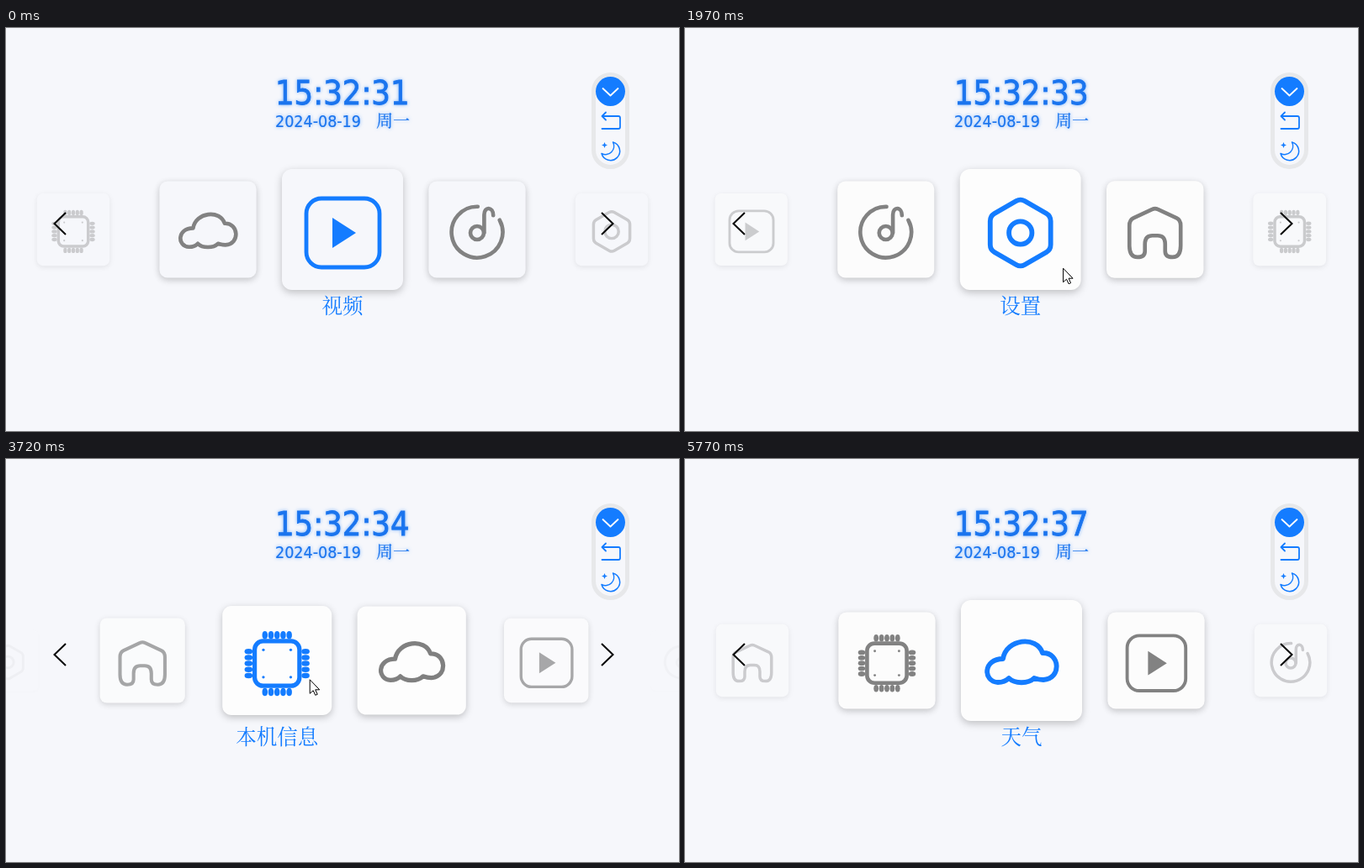
Write an HTML page that moves like this. It is 800 by 480 pixels and loops after 6.05 s.

```html
<!DOCTYPE html>
<html lang="zh">
<head>
<meta charset="utf-8">
<style>
  html, body { margin: 0; height: 100%; overflow: hidden; background: #f6f7fb; }
  svg { display: block; width: 800px; height: 480px; }
  text { fill: #147cff; font-family: "DejaVu Sans Condensed", "Open Sans", "Noto Sans", sans-serif; }
  .cjk { font-family: "Noto Serif CJK SC", "Noto Sans CJK SC", serif; font-weight: 300; }
  .glow { filter: drop-shadow(0 0 2px #147cff88); }
  .glow text { fill: #1a74ee; stroke: #1a74ee; stroke-width: .2; }
  .line { fill: none; stroke: #147cff; stroke-width: 1.8; stroke-linecap: round; stroke-linejoin: round; }
  .arrow { fill: none; stroke: #000; stroke-width: 2; }
  .tile { filter: drop-shadow(0 3px 5px #0000003a); }
  .icon { fill: none; stroke: currentColor; stroke-width: 5.8; stroke-linecap: round; stroke-linejoin: round; }
  .solid { fill: currentColor; stroke: none; }
</style>
</head>
<body>
<svg viewBox="0 0 800 480">
  <g class="glow">
    <text id="clock" x="320" y="90.5" font-size="39.5" style="stroke-width:.8"></text>
    <text x="320" y="118" font-size="19.5">2024-08-19</text>
    <text class="cjk" x="440" y="118" font-size="20">周一</text>
  </g>

  <rect x="698.5" y="55.5" width="40" height="110" rx="20" fill="#f6f7fb" stroke="#e7e8ea" stroke-width="5"/>
  <circle cx="718.5" cy="75.5" r="17.5" fill="#147cff"/>
  <path class="line" style="stroke:#fff" d="M709.5 72l9 8.5 9-8.5"/>
  <path class="line" d="M713 100.5l-4.5 4.5 4.5 4.5M708.5 105H728q2 0 2 2v11q0 2-2 2h-19.5"/>
  <path class="line" style="stroke-width:1.5" d="M721.5 136A11 11 0 1 1 708 149.5A10 10 0 0 0 721.5 136Z"/>
  <path fill="#147cff" d="M711.5 136l1 2.5 2.5 1-2.5 1-1 2.5-1-2.5-2.5-1 2.5-1z"/>

  <g id="tiles"></g>
  <text id="label" class="cjk" y="340" font-size="24.5" text-anchor="middle"></text>
  <path class="arrow" d="M71 220L57.5 233L71 246M708 220L721.5 233L708 246"/>
  <path id="cursor" d="M0 0V16.5L4 13L6.5 18.5L9 17.5L6.5 12H11.5Z" fill="#fff" stroke="#000"/>
</svg>
<script>
const LOOP = 6050, GAP = 160, SNAP = 340, FADE = 470;
const $ = id => document.getElementById(id);
const clamp = (v, lo = 0, hi = 1) => Math.min(hi, Math.max(lo, v));
const mix = (a, b, s) => a + (b - a) * s;
const easeOut = s => 1 - (1 - s) ** 2;
const easeInOut = s => (1 - Math.cos(Math.PI * s)) / 2;

const pins = [-16, -8, 0, 8, 16].map(v => [-37.5, 37.5].map(e =>
  `<ellipse cx="${v}" cy="${e}" rx="3.6" ry="5.3"/><ellipse cx="${e}" cy="${v}" rx="5.3" ry="3.6"/>`).join('')).join('');
const dots = [-18, 18].map(x => [-18, 18].map(y => `<circle cx="${x}" cy="${y}" r="1.8"/>`).join('')).join('');

const apps = [
  ['视频', `<rect x="-43" y="-41" width="87" height="82" rx="18" stroke-width="4.8"/>
    <path class="solid" d="M-12-18L16 0L-12 18Z"/>`],
  ['音乐', `<path d="M1-38A38 38 0 1 0 33.5-18M10.5 1V-26C10.5-39 24-38 24-25"/><circle cy="1" r="10"/>`],
  ['设置', `<path d="M-5-38Q0-41 5-38L31-23Q36-20 36-14V14Q36 20 31 23L5 38Q0 41-5 38L-31 23Q-36 20-36 14V-14Q-36-20-31-23Z"/>
    <circle r="13.7"/>`],
  ['智能家居', `<path d="M-4-34Q0-36 4-34L32-21Q38-18 38-10V20Q38 37 26 37Q15 37 15 28V18Q15 5 4 5H-4Q-15 5-15 18V28Q-15 37-26 37Q-38 37-38 20V-10Q-38-18-32-21Z"/>`],
  ['本机信息', `<rect x="-29.5" y="-29.5" width="59" height="59" rx="11"/><g class="solid">${pins}${dots}</g>`],
  ['天气', `<path d="M-28 22C-46 21-46-6-22-6C-18-30 18-34 25-13C46-14 48 18 26 19C22 19 18 18 15 17C8 24-8 24-15 17C-19 21-23 22-28 22Z"/>`]
];
$('tiles').innerHTML = apps.map(([, art]) => `<g>
  <rect class="tile" x="-72" y="-72" width="144" height="144" rx="12"/>
  <g class="icon" transform="translate(0 4)">${art}</g></g>`).join('');
const tiles = [...$('tiles').children];

// Each swipe: press time, x, y and release time, x, y
const swipes = [
  [620, 444, 304, 900, 307, 296],
  [1270, 483, 292, 1660, 252, 288],
  [2050, 471, 286, 2370, 294, 281],
  [2870, 453, 270, 3120, 280, 262],
  [3450, 439, 264, 4190, 309, 262]
];
const pulled = s => (s[1] - s[4]) / GAP;

// Moments when the next app becomes the current one
const turns = [-1e6, ...swipes.map(s => mix(s[0], s[3], 1 - Math.sqrt(1 - .5 / pulled(s)))), 1e6];
const faded = (t, k) => clamp((t - turns[k]) / FADE);

function position(t) {
  const k = swipes.findLastIndex(s => t >= s[0]);
  if (k < 0) return 0;
  const s = swipes[k];
  if (t < s[3]) return k + pulled(s) * easeOut((t - s[0]) / (s[3] - s[0]));
  return mix(k + pulled(s), k + 1, easeInOut(clamp((t - s[3]) / SNAP)));
}

const stops = [[190, 475, 480], ...swipes.flatMap(s => [s.slice(0, 3), s.slice(3)]),
  [4300, 309, 262], [5070, 597, 480]];

function pointer(t) {
  const k = clamp(stops.findLastIndex(p => t >= p[0]), 0, stops.length - 2);
  const [a, b] = [stops[k], stops[k + 1]];
  const s = clamp((t - a[0]) / (b[0] - a[0]));
  const e = k == stops.length - 2 ? s ** 1.5 : k % 2 ? easeOut(s) : easeInOut(s);
  return [mix(a[1], b[1], e), mix(a[2], b[2], e)];
}

function draw(now) {
  const t = now % LOOP, p = position(t);
  $('clock').textContent = '15:32:' + (31 + Math.floor((t + 230) / 1000));

  tiles.forEach((tile, i) => {
    const d = ((i - p + 9) % 6 + 6) % 6 - 3, far = Math.abs(d);
    const blue = faded(t, i) - faded(t, i + 1);
    tile.setAttribute('transform', `translate(${400 + GAP * d} 240) scale(${1 - .2 * far})`);
    tile.setAttribute('opacity', clamp(.98 - .62 * (far - 1)));
    tile.setAttribute('color', `rgb(${mix(128, 20, blue)},${mix(128, 124, blue)},${mix(128, 255, blue)})`);
    tile.firstElementChild.setAttribute('fill', t < 190 ? '#f6f7fb' : '#fdfdfd');
  });

  const current = turns.findLastIndex(turn => t >= turn);
  $('label').textContent = apps[current][0];
  $('label').setAttribute('x', 400 + GAP * (current - p));

  $('cursor').setAttribute('transform', `translate(${pointer(t)})`);
  $('cursor').setAttribute('visibility', t >= 190 && t < 5070 ? 'visible' : 'hidden');
  requestAnimationFrame(draw);
}
draw(0);
</script>
</body>
</html>
```
